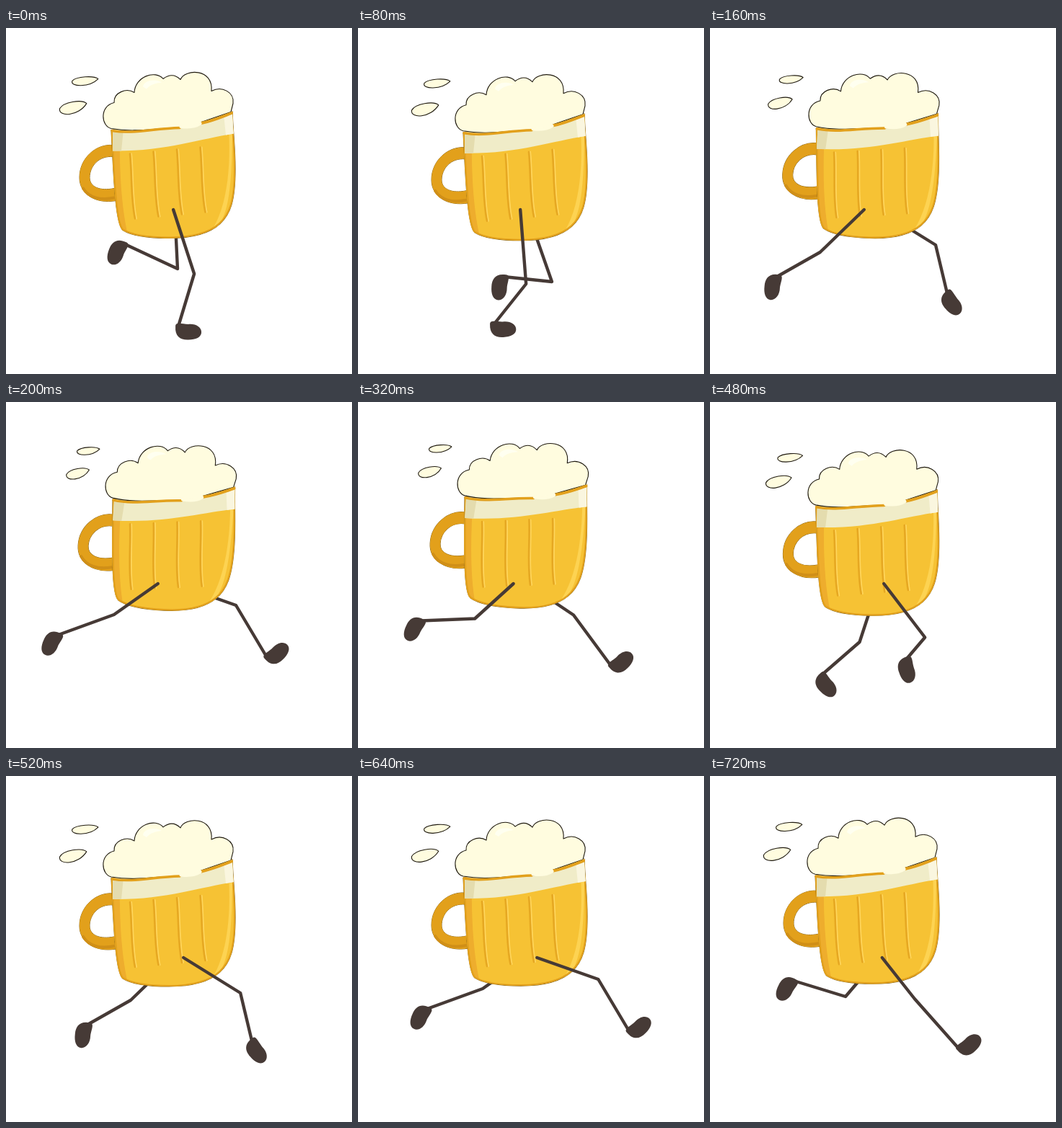
Write an HTML page with a canvas that moves like this. It is 480 px wide and 480 px high and loops after 760 ms.

```html
<!DOCTYPE html>
<html lang="en">
<head>
<meta charset="utf-8">
<title>Running beer mug</title>
<style>
  html, body { margin: 0; width: 100%; height: 100%; overflow: hidden; background: #fff; }
  canvas { display: block; width: 480px; height: 480px; }
</style>
</head>
<body>
<canvas id="stage" width="480" height="480"></canvas>
<script>
const ctx = document.getElementById('stage').getContext('2d');
const LOOP = 760, STEP = 40, POSES = 18, HALF = POSES / 2;
const HIP_Y = 252, BACK_HIP_X = 234;
const DARK = '#463a36', OUTLINE = '#1f1a10', CREAM = '#fffcdf', AMBER = '#e2a01c';

// Key poses of one leg; x is relative to the hip, the shoe turns in degrees.
const STRIDE = [
  { at: 0, knee: [29, 341], ankle: [6, 417], shoe: 0 },
  { at: 1, knee: [8, 355], ankle: [-39, 414], shoe: -2 },
  { at: 3, knee: [-61, 311], ankle: [-121, 345], shoe: 97 },
  { at: 4, knee: [-61, 295], ankle: [-138, 323], shoe: 115 },
  { at: 6, knee: [-61, 295], ankle: [-138, 323], shoe: 115 },
  { at: 8, knee: [-46, 306], ankle: [-118, 284], shoe: 118 },
  { at: 9, knee: [4, 334], ankle: [-71, 299], shoe: 112 },
  { at: 10, knee: [35, 352], ankle: [-32, 345], shoe: 95 },
  { at: 12, knee: [79, 301], ankle: [95, 368], shoe: 50 },
  { at: 13, knee: [85, 282], ankle: [129, 356], shoe: -44 },
  { at: 15, knee: [85, 282], ankle: [129, 356], shoe: -44 },
  { at: 17, knee: [45, 309], ankle: [108, 380], shoe: -43 },
  { at: 18, knee: [29, 341], ankle: [6, 417], shoe: 0 }
];

const mix = (a, b, u) => a + (b - a) * u;
const clamp = v => Math.min(1, Math.max(0, v));
const wave = (pose, period) => Math.sin(2 * Math.PI * pose / period);

// The mug bounces twice per loop and leans forward during the first stride.
const bounce = pose => .5 + 3 * wave(pose, HALF) + 2.5 * wave(pose, HALF / 2) - 1.3 * wave(pose, HALF / 3);
const leanAt = pose => clamp((5.5 - Math.abs(pose - 6.5)) / 3);
const frontHipX = pose => 230 - 20 * wave(pose - .3, POSES);

function legAt(pose) {
  const next = STRIDE.findIndex(key => key.at > pose);
  const a = STRIDE[next - 1], b = STRIDE[next];
  const u = (pose - a.at) / (b.at - a.at);
  const point = part => a[part].map((v, n) => mix(v, b[part][n], u));
  return { knee: point('knee'), ankle: point('ankle'), shoe: mix(a.shoe, b.shoe, u) };
}

function fill(d, color) {
  ctx.fillStyle = color;
  ctx.fill(new Path2D(d), 'evenodd');
}

function stroke(d, color, width) {
  ctx.strokeStyle = color;
  ctx.lineWidth = width;
  ctx.stroke(new Path2D(d));
}

function placed(x, y, angle, paint) {
  ctx.save();
  ctx.translate(x, y);
  ctx.rotate(angle);
  paint();
  ctx.restore();
}

function drawLeg(hipX, pose) {
  const { knee: [kx, ky], ankle: [ax, ay], shoe } = legAt(pose % POSES);
  stroke(`M${hipX} ${HIP_Y} L${hipX + kx} ${ky} L${hipX + ax} ${ay}`, DARK, 4.4);
  placed(hipX + ax, ay, shoe * Math.PI / 180, () =>
    fill('M-3 -3 C-3 -10 6 -6 15 -6 C25 -7 33 -2 33 5 C33 12 25 15.5 15 15.5 C4 16 -4 11 -3 -3Z', DARK));
}

function drawDrop(x, y, width, thickness, angle) {
  const w = width / 2, h = thickness * width / 40;
  const d = `M${w} ${-h * .3} C${w * .7} ${-h * 1.15} ${-w * .6} ${-h * 1.2} ${-w * .95} ${-h * .2}
    C${-w * 1.15} ${h * 1.2} ${w * .3} ${h * 1.6} ${w} ${-h * .3}Z`;
  placed(x, y, angle, () => {
    fill(d, CREAM);
    stroke(d, OUTLINE, 1.1);
  });
}

const HANDLE = 'M148 162 C125 160 102 180 102 207 C102 230 124 244 153 239 L150 222 ' +
  'C130 226 116 220 116 207 C116 192 128 176 149 178Z';
const MUG = 'M146 141 L314 115 C315 145 318 165 318 195 C318 240 311 258 297 271 ' +
  'C282 285 255 291 226 291 C197 291 173 287 162 280 C151 271 149 195 146 141Z';
const FOAM = 'M146 139 C132 136 129 108 150 103 C149 89 167 82 178 89 C179 67 207 57 218 70 ' +
  'Q231 60 242 71 C248 56 288 55 285 87 C300 79 317 89 315 104 L312 116 L271 130 ' +
  'C265 140 247 136 238 138 C208 138 180 145 146 139Z';

function drawRibs() {
  for (let n = 0; n < 4; n++) {
    const x = 172 + 32.5 * n, top = 174 - 3 * n;
    const rib = `M${x} ${top} C${x + 3} ${top + 30} ${x + 1} ${top + 62} ${x + 7} ${top + 90}`;
    placed(2, 0, 0, () => stroke(rib, '#ffd65d', 2));
    stroke(rib, '#e6a822', 2.6);
  }
}

function drawMug(lean, bob) {
  ctx.save();
  ctx.transform(1, .05 * lean, -.06 * lean, 1, 10.5 * lean, -12 * lean + bob);

  stroke(HANDLE, '#8a6414', 1);
  fill(HANDLE, '#e2a01b');
  stroke('M107 222 C115 235 131 239 150 235', '#d08f17', 4);

  stroke(MUG, '#8a6414', 1.2);
  fill(MUG, '#f6c234');
  ctx.save();
  ctx.clip(new Path2D(MUG));
  fill('M145 140 L158 140 C157 195 160 250 170 290 L150 290Z', '#eead2d');
  fill('M307 115 C314 180 309 248 283 284 C306 270 315 240 314 115Z', '#fdd352');
  stroke(MUG, AMBER, 4);
  fill('M148 141 L314 114 L316 146 C270 153 220 171 148 170Z', '#f0ecc8');
  fill('M148 141 L163 140 L160 170 L148 170Z', '#e4dcae');
  fill('M302 119 L314 114 L316 146 L305 148Z', '#faf6df');
  ctx.restore();
  drawRibs();

  fill(FOAM, CREAM);
  stroke(FOAM, OUTLINE, 1.1);
  fill('M190 81 C191 71 209 70 216 75 C207 76 200 78 195 84Z', '#fffff0');
  stroke('M147 142 C176 147 204 139 241 138', AMBER, 3.5);
  stroke('M271 131.5 C288 128 301 122 313 117.5', AMBER, 4);
  stroke('M243 136 Q260 138 269 132', CREAM, 5);
  ctx.restore();
}

function draw(time) {
  const slot = Math.floor(time % LOOP / STEP);
  const pose = Math.max(0, slot - 1); // the first pose is held twice as long
  const lean = leanAt(pose), bob = bounce(pose);

  ctx.fillStyle = '#fff';
  ctx.fillRect(0, 0, 480, 480);
  ctx.lineCap = ctx.lineJoin = 'round';

  drawDrop(109.5 + 4.5 * lean, 73 - 4 * lean + bob, 37 - 5 * lean, 6.5, -.06);
  drawDrop(93 + 6.5 * lean, 110 - 10 * lean + bob * .7, 39 - 6 * lean, 8.5, -.17);

  drawLeg(BACK_HIP_X, pose + HALF);
  drawMug(lean, bob);
  drawLeg(frontHipX(pose), pose);
}

const start = performance.now();
function tick() {
  draw(performance.now() - start);
  requestAnimationFrame(tick);
}
tick();
</script>
</body>
</html>
```
